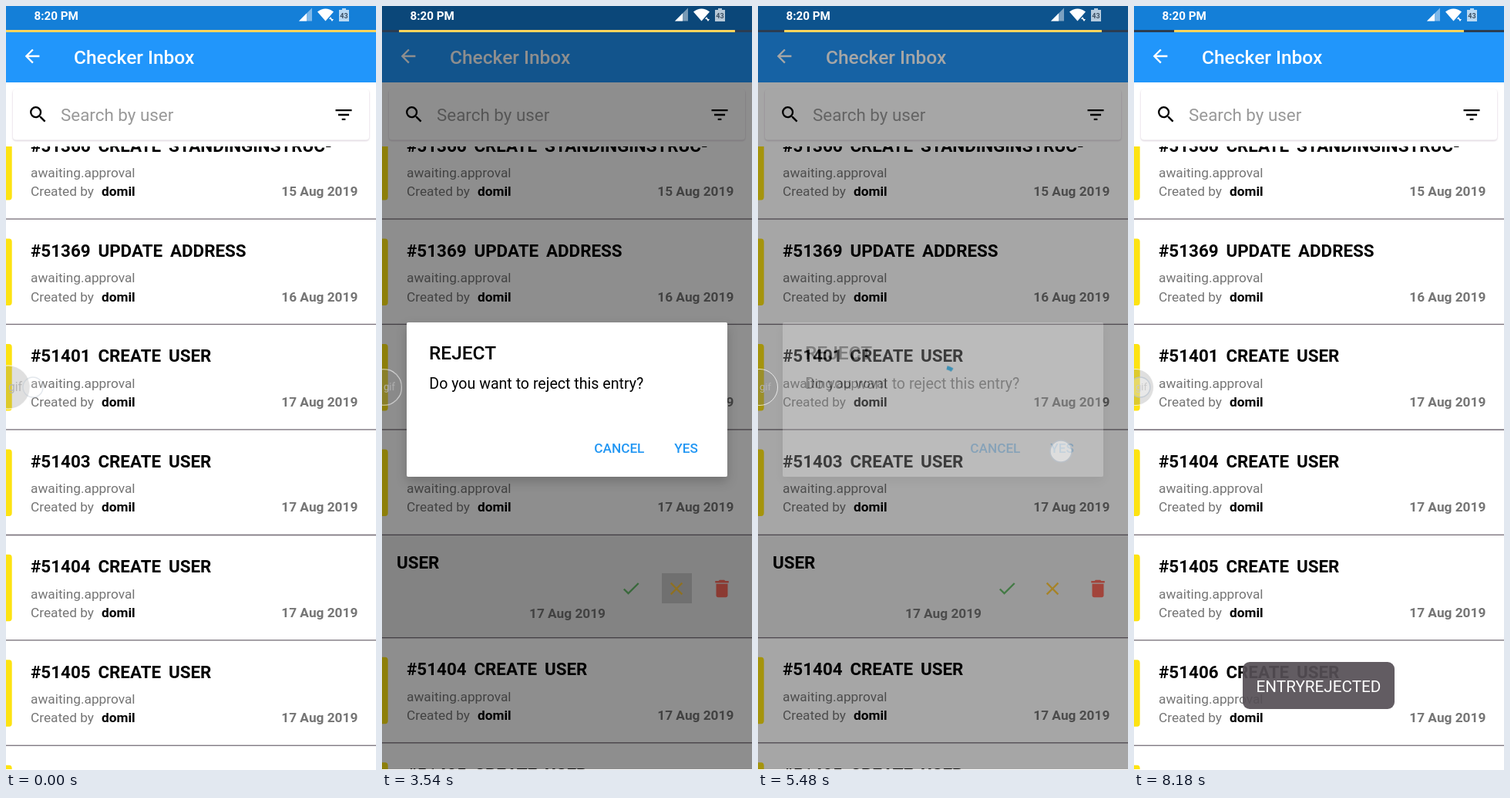
Animation, 480 px wide and 990 px high, one loop 8280 ms. Source, as an HTML page:

```html
<!DOCTYPE html>
<html lang="en">
<head>
<meta charset="utf-8">
<title>Checker Inbox</title>
<style>
  html, body { margin: 0; height: 100%; overflow: hidden; background: #fff; }
  svg { display: block; width: 480px; height: 990px; font-family: Roboto, sans-serif; }
  text { white-space: pre; }
  .h { font-size: 22.4px; font-weight: 700; }
  .t { font-size: 17.25px; fill: #757575; }
  .b { font-weight: 700; }
  .user { font-weight: 700; fill: #000; }
  .end { text-anchor: end; }
  .big { font-size: 24.5px; font-weight: 500; }
  .btn { font-size: 17.2px; font-weight: 500; fill: #2196f3; }

  #line, #ripple, #below, #dim, #dialog, #press, #spin, #arc, #toast, #bubble, .touch {
    animation: 8.28s linear infinite;
  }
  #line { animation-name: line; animation-timing-function: step-end; transform-origin: 240px 0; }
  #ripple { animation-name: ripple; }
  #below { animation-name: below; }
  #dim { animation-name: dim; }
  #dialog { animation-name: dialog; }
  #press { animation-name: press; animation-timing-function: step-end; }
  #spin { animation-name: spin; }
  #arc { animation-name: arc; }
  #toast { animation-name: toast; }
  #bubble { animation-name: bubble; animation-timing-function: step-end; transform-origin: 2px 494px; }
  #tapReject { animation-name: tapReject; }
  #tapYes { animation-name: tapYes; }
  #tapBubble { animation-name: tapBubble; }

  @keyframes line {
    0% { transform: none; }
    5.19% { transform: scaleX(.979); }
    8.81% { transform: scaleX(.971); }
    12.56% { transform: scaleX(.958); }
    18.11% { transform: scaleX(.95); }
    24.15% { transform: scaleX(.942); }
    27.77% { transform: scaleX(.929); }
    31.28% { transform: scaleX(.917); }
    37.44% { transform: scaleX(.908); }
    48.06% { transform: scaleX(.892); }
    51.69% { transform: scaleX(.879); }
    55.31% { transform: scaleX(.871); }
    59.18% { transform: scaleX(.858); }
    68.59% { transform: scaleX(.85); }
    75.72% { transform: scaleX(.838); }
    79.22% { transform: scaleX(.829); }
    82.73% { transform: scaleX(.821); }
    87.8% { transform: scaleX(.8); }
    91.42% { transform: scaleX(.792); }
    94.92%, 100% { transform: scaleX(.783); }
  }
  @keyframes ripple {
    0%, 11.59% { opacity: 0; }
    14%, 18.8% { opacity: .1; }
    22.46%, 100% { opacity: 0; }
  }
  @keyframes below {
    0% { transform: none; }
    14.49% { transform: translateY(0); animation-timing-function: cubic-bezier(.4, 0, .2, 1); }
    18.84%, 79.21% { transform: translateY(133px); }
    79.22%, 100% { transform: translateY(-136.45px); }
  }
  @keyframes dim {
    0%, 38.6% { opacity: 0; }
    42.75% { opacity: .44; }
    43.96%, 61.35% { opacity: .58; }
    66.18% { opacity: .35; }
    68.1%, 100% { opacity: 0; }
  }
  @keyframes dialog {
    0%, 38.6% { opacity: 0; }
    41.5%, 59.8% { opacity: 1; }
    61.35% { opacity: .81; }
    66.18% { opacity: .24; }
    68.1%, 100% { opacity: 0; }
  }
  @keyframes press {
    0% { opacity: 0; }
    35.7% { opacity: .14; }
    48.06%, 100% { opacity: 0; }
  }
  @keyframes spin {
    0%, 61.3% { opacity: 0; transform: rotate(-92deg); }
    61.31% { opacity: 1; transform: rotate(-92deg); }
    66.18% { opacity: 1; transform: rotate(-77deg); }
    78.5% { opacity: 1; transform: rotate(102deg); }
    78.51%, 100% { opacity: 0; transform: rotate(102deg); }
  }
  @keyframes arc {
    0%, 66% { stroke-dasharray: 20 340; stroke-dashoffset: 0; animation-timing-function: cubic-bezier(.4, 0, .2, 1); }
    74% { stroke-dasharray: 285 75; stroke-dashoffset: 0; animation-timing-function: cubic-bezier(.4, 0, .2, 1); }
    82.05%, 100% { stroke-dasharray: 20 340; stroke-dashoffset: -270; }
  }
  @keyframes toast {
    0%, 79.22% { opacity: 0; }
    83.8%, 100% { opacity: 1; }
  }
  @keyframes bubble {
    0% { transform: translateX(1px) scale(1.2); }
    1.2%, 100% { transform: none; }
  }
  @keyframes tapReject {
    0%, 33.8% { opacity: 0; }
    33.85%, 35% { opacity: .85; }
    36.3%, 100% { opacity: 0; }
  }
  @keyframes tapYes {
    0%, 58% { opacity: 0; }
    58.1%, 61.4% { opacity: .9; }
    66.2% { opacity: .6; }
    67.4%, 100% { opacity: 0; }
  }
  @keyframes tapBubble {
    0% { opacity: .4; transform: translateX(27px); }
    5.19% { opacity: 0; transform: translateX(27px); }
    5.2%, 94.91% { opacity: 0; transform: none; }
    94.92%, 100% { opacity: .7; transform: none; }
  }
</style>
</head>
<body>
<svg viewBox="0 0 480 990">
  <defs>
    <clipPath id="listArea"><path d="M0 182H480V989H0z"/></clipPath>
    <filter id="shadow" x="-10%" y="-10%" width="120%" height="130%">
      <feDropShadow dx="0" dy="6" stdDeviation="7" flood-opacity=".2"/>
    </filter>
    <filter id="soft" x="-5%" y="-10%" width="110%" height="125%">
      <feDropShadow dx="0" dy="1" stdDeviation="1.2" flood-color="#a58aa5" flood-opacity=".5"/>
    </filter>
  </defs>
  <rect width="480" height="990" fill="#fff"/>

  <g clip-path="url(#listArea)">
    <g id="above"></g>
    <rect id="ripple" y="549" width="480" height="136"/>
    <g id="panel">
      <rect y="686" width="480" height="134" fill="#eaeaea"/>
      <text class="h" x="19" y="729">USER</text>
      <text class="t b end" x="290" y="793">17 Aug 2019</text>
      <rect id="press" x="363" y="735" width="39" height="39"/>
      <path transform="translate(309 740.6) scale(1.17)" fill="#66bb6a" d="M9 16.17 4.83 12l-1.42 1.41L9 19 21 7l-1.41-1.41z"/>
      <path transform="translate(368 741) scale(1.17)" fill="#ffc93c" d="M19 6.41 17.59 5 12 10.59 6.41 5 5 6.41 10.59 12 5 17.59 6.41 19 12 13.41 17.59 19 19 17.59 13.41 12z"/>
      <path transform="translate(426 740) scale(1.25)" fill="#f9685a" d="M6 19c0 1.1.9 2 2 2h8c1.1 0 2-.9 2-2V7H6zM19 4h-3.5l-1-1h-5l-1 1H5v2h14z"/>
    </g>
    <g id="below"><rect y="685" width="480" height="600" fill="#fff"/></g>
  </g>

  <rect x="9" y="108" width="462" height="65.5" rx="4" fill="#fff" filter="url(#soft)"/>
  <path transform="translate(27.5 126.5) scale(1.17)" d="M15.5 14h-.79l-.28-.27A6.47 6.47 0 0 0 16 9.5 6.5 6.5 0 1 0 9.5 16c1.61 0 3.09-.59 4.23-1.57l.27.28v.79l5 4.99L20.49 19zm-6 0a4.5 4.5 0 1 1 0-9 4.5 4.5 0 0 1 0 9z"/>
  <text x="71" y="149" font-size="22.4" fill="#999">Search by user</text>
  <path transform="translate(424 127) scale(1.17)" d="M10 18h4v-2h-4zM3 6v2h18V6zm3 7h12v-2H6z"/>

  <rect width="480" height="99" fill="#2196fb"/>
  <rect width="480" height="32" fill="#147fd8"/>
  <path transform="translate(20 51) scale(1.17)" fill="#fff" d="M20 11H7.83l5.59-5.59L12 4l-8 8 8 8 1.41-1.41L7.83 13H20z"/>
  <text class="big" x="88" y="74.5" fill="#fff">Checker Inbox</text>

  <g transform="translate(240 490)"><g id="spin">
    <circle id="arc" r="22" pathLength="360" fill="none" stroke="#03a9f4" stroke-width="5"/>
  </g></g>

  <rect id="dim" width="480" height="989"/>

  <g id="dialog">
    <rect x="32" y="410" width="416" height="200" rx="2" fill="#fff" filter="url(#shadow)"/>
    <text class="big" x="61" y="458">REJECT</text>
    <text x="61.3" y="496" font-size="19.6">Do you want to reject this entry?</text>
    <text class="btn" x="275.3" y="578.5">CANCEL</text>
    <text class="btn" x="379.3" y="578.5">YES</text>
  </g>

  <g id="toast">
    <rect x="141" y="850" width="197" height="61" rx="9" fill="#554f55" fill-opacity=".92"/>
    <text x="239.5" y="888.5" font-size="20.7" fill="#fff" text-anchor="middle">ENTRYREJECTED</text>
  </g>

  <g fill="#fff">
    <text class="b" x="36.5" y="18" font-size="15.2">8:20 PM</text>
    <path d="M380 19.5 397 2.5V19.5z" opacity=".45"/>
    <path d="M380 19.5 390 9.5V19.5z"/>
    <path d="M404 7.5Q414.5-.5 425 7.5L414.5 19.5z"/>
    <path d="M419 17l2-3 2 3zM421 17h4l-2 3z"/>
    <path d="M436 3h5v2h4v15h-13V5h4z" opacity=".7"/>
    <text class="b" x="438.5" y="16" font-size="9" fill="#3b4f63" text-anchor="middle">43</text>
  </g>
  <rect y="31" width="480" height="3" fill="#2b3d52"/>
  <rect id="line" y="31" width="480" height="3" fill="#ffd45c"/>

  <g id="bubble">
    <circle cx="2" cy="494" r="23.5" fill="#808080" fill-opacity=".25" stroke="#fff" stroke-opacity=".75"/>
    <text x="2" y="498" font-size="13" fill="#b4b4b4">gif</text>
  </g>
  <g fill="#fff" fill-opacity=".85" stroke="#b9c4d0" stroke-width="1.5">
    <circle class="touch" id="tapReject" cx="377.5" cy="754" r="14"/>
    <circle class="touch" id="tapYes" cx="393" cy="577" r="14"/>
    <circle class="touch" id="tapBubble" cx="8" cy="494" r="13" fill-opacity=".4"/>
  </g>
</svg>
<script>
  const PITCH = 136.45, TOP = 276;

  // One list entry; slot 0 is the first entry that is fully visible.
  const row = (slot, id, action, entity, day) => `
    <g transform="translate(0 ${TOP + slot * PITCH})">
      <path d="M0 25.5H4Q7.7 25.5 7.7 29.5V108Q7.7 112 4 112H0z" fill="#fde312"/>
      <text class="h" x="32" y="49">#${id}<tspan dx="9.8">${action}</tspan><tspan dx="9.8">${entity}</tspan></text>
      <text class="t" x="32" y="82.3">awaiting.approval</text>
      <text class="t" x="32" y="106.5">Created by</text>
      <text class="t user" x="124" y="106.5">domil</text>
      <text class="t b end" x="456.3" y="106.5">${day} Aug 2019</text>
      <rect y="135.8" width="480" height="1.3" fill="#776f79"/>
    </g>`;
  const userRow = (slot, id) => row(slot, id, 'CREATE', 'USER', 17);
  const add = (id, html) => document.getElementById(id).insertAdjacentHTML('beforeend', html);

  add('above',
    row(-1, 51366, 'CREATE', 'STANDINGINSTRUC-', 15) +
    row(0, 51369, 'UPDATE', 'ADDRESS', 16) +
    userRow(1, 51401) + userRow(2, 51403));
  add('below',
    `<rect y="685" width="480" height="1.3" fill="#776f79"/>` +
    [51404, 51405, 51406, 51407].map((id, i) => userRow(3 + i, id)).join(''));
</script>
</body>
</html>
```
